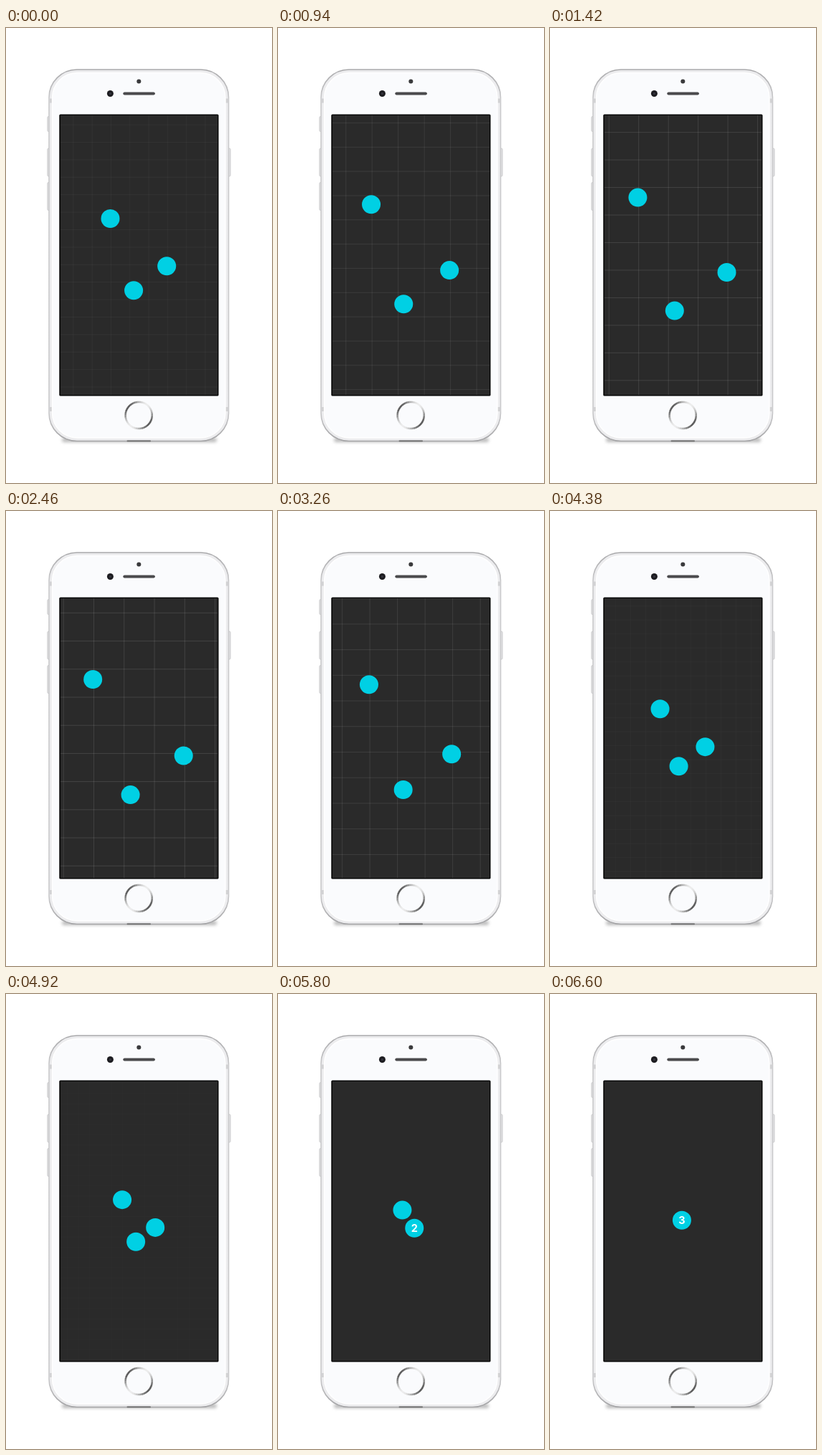
An HTML page for the animation above (8840 ms loop, 371 px wide and 635 px high).

```html
<!DOCTYPE html>
<html lang="en">
<head>
<meta charset="utf-8">
<title>Map clustering</title>
<style>
  html, body { margin: 0; width: 100%; height: 100%; overflow: hidden; background: #fff; }
  svg { display: block; width: 371px; height: 635px; }
  text { font: 700 14.5px Inter, "Liberation Sans", sans-serif; fill: #fff; text-anchor: middle; }
</style>
</head>
<body>
<svg viewBox="0 0 371 635">
  <defs>
    <linearGradient id="metal" x2="0" y2="1">
      <stop offset="0" stop-color="#a9a9ab"/>
      <stop offset=".08" stop-color="#c9c9cb"/>
      <stop offset=".92" stop-color="#c9c9cb"/>
      <stop offset="1" stop-color="#a4a4a6"/>
    </linearGradient>
    <filter id="soft" x="-20%" y="-300%" width="140%" height="700%">
      <feGaussianBlur stdDeviation="2.2"/>
    </filter>
    <clipPath id="screen"><rect x="76" y="122" width="219" height="390"/></clipPath>
  </defs>
  <rect width="371" height="635" fill="#fff"/>
  <rect x="78" y="572" width="216" height="6" rx="3" fill="#777" opacity=".5" filter="url(#soft)"/>
  <g fill="#e6e6e8" stroke="#bdbdbf" stroke-width=".8">
    <rect x="57.9" y="123.5" width="4" height="21" rx="1.4"/>
    <rect x="57.9" y="168" width="4" height="39" rx="1.4"/>
    <rect x="57.9" y="215.5" width="4" height="39" rx="1.4"/>
    <rect x="309" y="168" width="4" height="39" rx="1.4"/>
  </g>
  <rect x="60" y="58" width="250.5" height="518.5" rx="39" fill="#ececee" stroke="url(#metal)" stroke-width="1.6"/>
  <g fill="#d2d2d4">
    <rect x="60" y="98.5" width="5" height="6"/>
    <rect x="305.5" y="98.5" width="5" height="6"/>
    <rect x="60" y="529" width="5" height="6"/>
    <rect x="305.5" y="529" width="5" height="6"/>
  </g>
  <rect x="64.5" y="62.5" width="241.5" height="509.5" rx="35" fill="#fafbfd" stroke="#fff" stroke-width="1.4"/>
  <rect x="168.5" y="575.6" width="33.5" height="1.6" rx=".8" fill="#666"/>
  <circle cx="185.3" cy="74.6" r="3" fill="#3a3a3c"/>
  <circle cx="145.4" cy="91.5" r="4.5" fill="#1c1c20"/>
  <circle cx="145.4" cy="91.5" r="1.6" fill="#34343e"/>
  <rect x="163.3" y="89.5" width="44.6" height="4" rx="2" fill="#4b4b4d"/>
  <g id="ring" fill="none" stroke-width="2.5"></g>
  <rect x="74.3" y="120.4" width="222.2" height="393.2" rx="1.5" fill="#050505"/>
  <rect x="76" y="122" width="219" height="390" fill="#2a2a2a"/>
  <g clip-path="url(#screen)">
    <path id="grid" fill="none" stroke="#fff"/>
    <g id="dots"></g>
  </g>
</svg>
<script>
const LOOP = 8840;
const CENTER = { x: 185.5, y: 317 };
const CELL = { x: 26.3, y: 24.4 };
const RADIUS = 13;
const MAX_ZOOM = 1.608;
const A = { x: -40, y: -51, count: 1 };
const B = { x: 38.7, y: 15.2, count: 1 };
const C = { x: -7.4, y: 49.2, count: 1 };
const ZOOM_OUT = [
  [3000, MAX_ZOOM], [3260, 1.465], [3900, 1.02], [4800, .632],
  [4920, .586], [5700, .334], [5800, .302], [6600, .13]
];

const byId = id => document.getElementById(id);
const svgNode = (tag, attrs, parent) => {
  const node = document.createElementNS('http://www.w3.org/2000/svg', tag);
  for (const key in attrs) node.setAttribute(key, attrs[key]);
  return parent.appendChild(node);
};

function bezierEase(p, x1, y1, x2, y2) {
  const at = (u, a, b) => 3 * (1 - u) ** 2 * u * a + 3 * (1 - u) * u * u * b + u ** 3;
  let low = 0, high = 1;
  for (let i = 0; i < 24; i++) {
    const mid = (low + high) / 2;
    if (at(mid, x1, x2) < p) low = mid; else high = mid;
  }
  return at(low, y1, y2);
}

// Monotone cubic interpolation, at rest at both ends.
function spline(keys, t) {
  const last = keys.length - 1;
  const slope = i => (keys[i + 1][1] - keys[i][1]) / (keys[i + 1][0] - keys[i][0]);
  const tangent = i => {
    if (i === 0 || i === last) return 0;
    const a = slope(i - 1), b = slope(i);
    return 2 * a * b / (a + b);
  };
  let i = 0;
  while (i < last - 1 && t > keys[i + 1][0]) i++;
  const span = keys[i + 1][0] - keys[i][0];
  const u = (t - keys[i][0]) / span, v = 1 - u;
  return keys[i][1] * v * v * (1 + 2 * u) + keys[i + 1][1] * u * u * (3 - 2 * u)
    + span * u * v * (v * tangent(i) - u * tangent(i + 1));
}

function zoomAt(t) {
  if (t <= 600) return 1;
  if (t < 1860) return 1 + (MAX_ZOOM - 1) * bezierEase((t - 600) / 1260, .2, .2, .1, 1);
  if (t <= 3000) return MAX_ZOOM;
  return t < 6600 ? spline(ZOOM_OUT, t) : .13;
}

const touching = (p, q, zoom) => Math.hypot(p.x - q.x, p.y - q.y) * zoom < 2 * RADIUS;
const merge = (p, q) => ({ x: (p.x + q.x) / 2, y: (p.y + q.y) / 2, count: p.count + q.count });

function clusters(zoom) {
  if (!touching(B, C, zoom)) return [A, B, C];
  const pair = merge(B, C);
  return touching(A, pair, zoom) ? [merge(A, pair)] : [A, pair];
}

function gridPath(zoom) {
  let d = '';
  const stepX = CELL.x * zoom, stepY = CELL.y * zoom;
  const firstX = CENTER.x + .4 + stepX / 2, firstY = CENTER.y - 11.1 * zoom;
  for (let x = firstX - Math.floor((firstX - 76) / stepX) * stepX; x < 295; x += stepX)
    d += `M${x.toFixed(2)} 122v390`;
  for (let y = firstY - Math.floor((firstY - 122) / stepY) * stepY; y < 512; y += stepY)
    d += `M76 ${y.toFixed(2)}h219`;
  return d;
}

const SEGMENTS = 72;
for (let i = 0; i < SEGMENTS; i++) {
  const point = k => {
    const a = k * 2 * Math.PI / SEGMENTS;
    return `${185.2 + 18.6 * Math.cos(a)} ${540.5 + 18.6 * Math.sin(a)}`;
  };
  const shade = 158 - 78 * Math.cos(2 * (i * 360 / SEGMENTS - 215) * Math.PI / 180);
  svgNode('path', { d: `M${point(i)}L${point(i + 1.1)}`, stroke: `rgb(${shade},${shade},${shade})` }, byId('ring'));
}

const grid = byId('grid');
const pins = [A, B, C].map(() => {
  const group = svgNode('g', {}, byId('dots'));
  svgNode('circle', { r: RADIUS, fill: '#00d0e4' }, group);
  return { group, label: svgNode('text', { y: 5.2 }, group) };
});

function render(t) {
  const zoom = zoomAt(t);
  grid.setAttribute('d', gridPath(zoom));
  grid.setAttribute('stroke-opacity', Math.max(0, .042 * zoom ** 2.2 - .003).toFixed(4));
  const visible = clusters(zoom);
  pins.forEach(({ group, label }, i) => {
    const dot = visible[i];
    group.setAttribute('display', dot ? 'inline' : 'none');
    if (!dot) return;
    group.setAttribute('transform', `translate(${CENTER.x + dot.x * zoom} ${CENTER.y + dot.y * zoom})`);
    label.textContent = dot.count > 1 ? dot.count : '';
  });
}

const start = performance.now();
function frame() {
  render((performance.now() - start) % LOOP);
  requestAnimationFrame(frame);
}
render(0);
requestAnimationFrame(frame);
</script>
</body>
</html>
```
